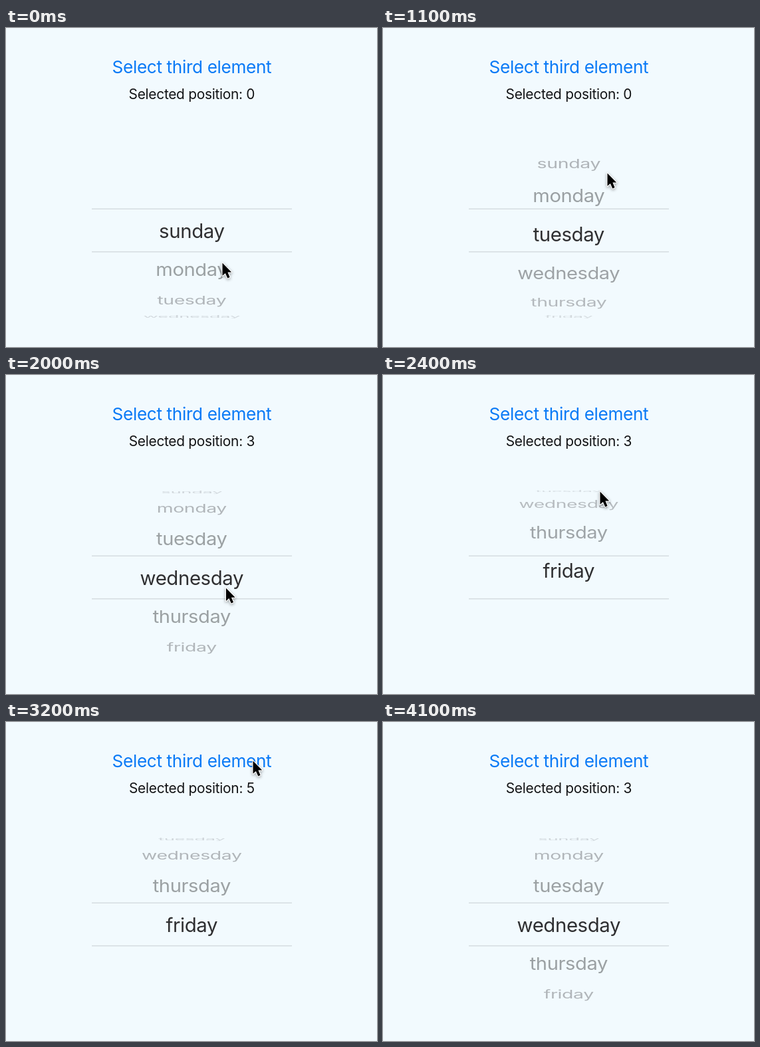
An HTML page with a canvas that plays this animation: 558 px wide and 480 px high, repeating every 4600 ms.

```html
<!DOCTYPE html>
<html lang="en">
<head>
<meta charset="utf-8">
<title>Weekday picker</title>
<style>
html, body { margin: 0; width: 100%; height: 100%; overflow: hidden; background: #f2fafe; }
canvas { display: block; }
</style>
</head>
<body>
<canvas id="stage" width="558" height="480"></canvas>
<script>
const ctx = document.getElementById('stage').getContext('2d');
const W = 558, H = 480, LOOP = 4600, STEP = 100;
const days = ['sunday', 'monday', 'tuesday', 'wednesday', 'thursday', 'friday'];
const wheel = {
  x: 279.3, y: 305, r: 131, angle: 26.5 * Math.PI / 180, row: 61,
  start: 172, top: 272, bottom: 336.5, end: 437
};

// Where the pointer turns or rests; it eases from one stop to the next
const stops = [
  { t: 0, x: 325, y: 352 },
  { t: 300, x: 319, y: 354 },
  { t: 700, x: 328, y: 274 },
  { t: 1100, x: 337, y: 217 },
  { t: 1500, x: 349, y: 149 },
  { t: 1900, x: 331, y: 336 },
  { t: 2400, x: 326, y: 174 },
  { t: 2700, x: 326, y: 174 },
  { t: 3200, x: 371, y: 57 },
  { t: LOOP, x: 371, y: 57 }
];

const clamp = (v, lo, hi) => Math.min(hi, Math.max(lo, v));
const mix = (a, b, f) => a + (b - a) * f;

function ease(t, from, to) {
  const f = clamp((t - from) / (to - from), 0, 1);
  return f * f * (3 - 2 * f);
}

function pointerAt(t) {
  const i = stops.findIndex(s => s.t > t);
  const a = stops[i - 1], b = stops[i];
  const f = ease(t, a.t, b.t);
  return { x: mix(a.x, b.x, f), y: mix(a.y, b.y, f) };
}

// Wheel position in rows: two drags, a bounce at the end, then the button's jump
function rowAt(t, y) {
  if (t < 1600) return Math.max(0, (333.5 - y) / wheel.row);
  if (t < 1900) return 3;
  if (t < 2500) {
    const pos = Math.max(3, 3 + (318 - y) / wheel.row);
    return pos > 5 ? mix(5, pos, 0.5) : pos;
  }
  if (t < 3400) return 5 + 0.18 * Math.exp((2400 - t) / 150);
  return mix(5, 3, ease(t, 3400, 3900));
}

function label(text, y, size, color, alpha = 1) {
  ctx.globalAlpha = alpha;
  ctx.fillStyle = color;
  ctx.font = `440 ${size}px Inter, "Liberation Sans", sans-serif`;
  ctx.letterSpacing = -size * 0.014 + 'px';
  ctx.fillText(text, 0, y);
  ctx.globalAlpha = 1;
}

function drawDays(pos, selected) {
  days.forEach((day, i) => {
    const a = (i - pos) * wheel.angle;
    if (Math.abs(a) >= Math.PI / 2) return;
    const cos = Math.cos(a);
    ctx.save();
    ctx.translate(wheel.x, wheel.y + wheel.r * Math.sin(a));
    ctx.scale(1 / (1 + 0.085 * (1 - cos)), cos);
    label(day, 11, 29.4, '#262729', selected ? 0.96 : 0.1 + 0.36 * cos);
    ctx.restore();
  });
}

function drawBand(from, to, pos, selected) {
  ctx.save();
  ctx.beginPath();
  ctx.rect(0, from, W, to - from);
  ctx.clip();
  drawDays(pos, selected);
  ctx.restore();
}

function drawPointer({ x, y }) {
  ctx.save();
  ctx.translate(x + 0.5, y + 1.5);
  ctx.scale(0.88, 0.88);
  ctx.beginPath();
  [[0, 0], [0, 22], [5, 17.5], [8.8, 26], [12.6, 24.3], [9, 16], [15.6, 16]]
    .forEach(p => ctx.lineTo(...p));
  ctx.closePath();
  ctx.lineJoin = 'round';
  ctx.lineWidth = 2.6;
  ctx.strokeStyle = '#fff';
  ctx.shadowColor = 'rgba(0,0,0,.4)';
  ctx.shadowBlur = 4;
  ctx.shadowOffsetY = 1.5;
  ctx.stroke();
  ctx.shadowColor = 'transparent';
  ctx.fillStyle = '#000';
  ctx.fill();
  ctx.restore();
}

function draw(t) {
  const pointer = pointerAt(t);
  const pos = rowAt(t, pointer.y);
  const picked = t < 1800 ? 0 : t < 2900 || t >= 3500 ? 3 : 5;
  const press = t < 3400 ? 1 : mix(0.35, 1, ease(t, 3400, 3700));

  ctx.fillStyle = '#f2fafe';
  ctx.fillRect(0, 0, W, H);
  ctx.textAlign = 'center';

  ctx.save();
  ctx.translate(279.4, 0);
  label('Select third element', 68, 26.2, '#0a7af6', press);
  label('Selected position: ' + picked, 106.5, 20.9, '#131416');
  ctx.restore();

  drawBand(wheel.start, wheel.top, pos, false);
  drawBand(wheel.top, wheel.bottom, pos, true);
  drawBand(wheel.bottom, wheel.end, pos, false);

  ctx.fillStyle = '#d6dde1';
  for (const y of [wheel.top, wheel.bottom]) ctx.fillRect(129, y - 0.5, 301, 1.5);

  if (t < 4100) drawPointer(pointer);
}

const start = performance.now();
function tick() {
  const t = (performance.now() - start) % LOOP;
  draw(Math.floor(t / STEP) * STEP);
  requestAnimationFrame(tick);
}
tick();
</script>
</body>
</html>
```
